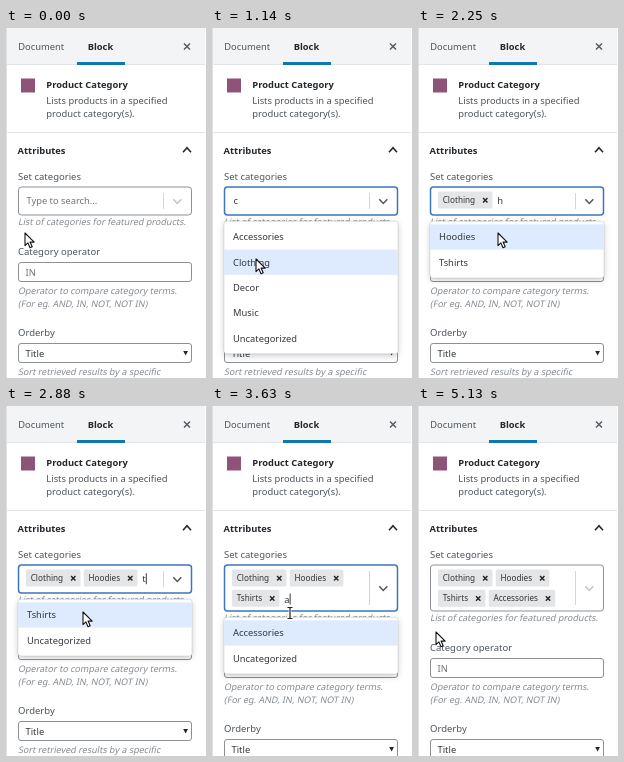
Recreate the animation shown at these times as an HTML page. Size 200 by 350 pixels, loop 5.31 s.

```html
<!DOCTYPE html>
<html lang="en">
<head>
<meta charset="utf-8">
<title>Category picker</title>
<style>
html, body { margin: 0; width: 100%; height: 100%; overflow: hidden; background: #fff; }
svg { display: block; width: 100vw; height: 100vh; }
text { font: 9.35px "Noto Sans", "Open Sans", sans-serif; fill: #4c545d; white-space: pre; }
.bold { font-weight: 600; fill: #23282d; }
.body { font-size: 9.4px; }
.label { font-size: 9.5px; }
.help { font-size: 9.05px; fill: #858b92; }
.value { fill: #32373c; }
.hint { font-size: 9.3px; fill: #747474; }
.tag { font-size: 8.2px; fill: #333; }
.box { fill: #fff; stroke: #8d9197; }
.line { fill: none; stroke-linecap: butt; }
.menu { fill: #fff; filter: drop-shadow(0 2.5px 3px rgba(0, 0, 0, .2)); }
</style>
</head>
<body>
<svg id="stage" viewBox="0 0 200 350" xmlns="http://www.w3.org/2000/svg">
  <rect width="200" height="350" fill="#fff"/>
  <g id="head"></g>
  <g id="lower"></g>
  <g id="control"></g>
  <g id="menu"></g>
  <g id="pointer"></g>
</svg>
<script>
const LOOP = 5310;
const ROW = 25.3, GROW = 18;
const $ = id => document.getElementById(id);

// Markup helpers
const text = (x, y, s, cls = '') => `<text x="${x}" y="${y}" class="${cls}">${s}</text>`;
const help = (y, s) => `<g transform="translate(12 ${y}) skewX(-11)">${text(0, 0, s, 'help')}</g>`;
const rect = (x, y, w, h, attrs) => `<rect x="${x}" y="${y}" width="${w}" height="${h}" ${attrs}/>`;
const line = (d, color, width) => `<path class="line" d="${d}" stroke="${color}" stroke-width="${width}"/>`;
const cross = (x, y, r, color, width) =>
  line(`M${x - r} ${y - r}l${2 * r} ${2 * r}M${x + r} ${y - r}l${-2 * r} ${2 * r}`, color, width);
const chevron = (x, y, w, h, color, width) =>
  line(`M${x - w} ${y - h / 2}l${w} ${h}l${w} ${-h}`, color, width);

const ruler = document.createElement('canvas').getContext('2d');
const widthOf = (s, size) => {
  ruler.font = `${size}px "Noto Sans", "Open Sans", sans-serif`;
  return ruler.measureText(s).width;
};

// What happens in the field, in order of time
const steps = [
  { at: 0, tags: [], typed: '' },
  { at: 420, focus: true, tags: [], typed: '' },
  { at: 570, focus: true, tags: [], typed: 'c',
    options: ['Accessories', 'Clothing', 'Decor', 'Music', 'Uncategorized'] },
  { at: 1200, focus: true, tags: ['Clothing'], typed: '' },
  { at: 1740, focus: true, tags: ['Clothing'], typed: 'h', options: ['Hoodies', 'Tshirts'] },
  { at: 2340, focus: true, tags: ['Clothing', 'Hoodies'], typed: '' },
  { at: 2640, focus: true, tags: ['Clothing', 'Hoodies'], typed: 't',
    options: ['Tshirts', 'Uncategorized'] },
  { at: 2970, focus: true, tags: ['Clothing', 'Hoodies', 'Tshirts'], typed: '' },
  { at: 3480, focus: true, tags: ['Clothing', 'Hoodies', 'Tshirts'], typed: 'a',
    options: ['Accessories', 'Uncategorized'] },
  { at: 4200, focus: true, tags: ['Clothing', 'Hoodies', 'Tshirts', 'Accessories'], typed: '' },
  { at: 4710, tags: ['Clothing', 'Hoodies', 'Tshirts', 'Accessories'], typed: '' }
];

// Pointer path: time, x, y
const path = [
  [0, 19, 205], [30, 19, 205], [400, 27, 172], [690, 27, 172], [1080, 44, 231],
  [1260, 44, 231], [1500, 42, 230], [1650, 42, 230], [2160, 80, 205], [2340, 80, 205],
  [2460, 77, 206], [2970, 77, 206], [3390, 78, 207], [3930, 78, 207], [4140, 74, 226],
  [4260, 74, 226], [4680, 18, 226], [LOOP, 18, 226]
];

function pointerAt(t) {
  const i = Math.max(1, path.findIndex(p => p[0] > t));
  const [t0, x0, y0] = path[i - 1], [t1, x1, y1] = path[i];
  const u = (t - t0) / (t1 - t0), k = u * u * (3 - 2 * u);
  return [x0 + (x1 - x0) * k, y0 + (y1 - y0) * k];
}

function drawStatic() {
  $('head').innerHTML =
    rect(0, 0, 199, 36, 'fill="#f3f4f5"') +
    rect(0, 36, 199, 1, 'fill="#e2e4e7"') +
    rect(0, 0, 1, 350, 'fill="#dfe1e4"') +
    rect(71, 34, 48, 3, 'fill="#0b78b0"') +
    text(12.3, 22, 'Document') +
    text(81.7, 22, 'Block', 'bold') +
    cross(181, 18.5, 3, '#555d66', 1.5) +
    rect(15, 50.5, 14, 14, 'fill="#8d5478"') +
    text(40.3, 59.7, 'Product Category', 'bold') +
    text(40.3, 76, 'Lists products in a specified', 'body') +
    text(40.3, 89, 'product category(s).', 'body') +
    rect(0, 104, 199, 1, 'fill="#e2e4e7"') +
    text(11.6, 126, 'Attributes', 'bold') +
    chevron(181, 122, 4, -4.4, '#23282d', 1.6) +
    text(12, 152.2, 'Set categories', 'label');

  $('lower').innerHTML =
    help(197.3, 'List of categories for featured products.') +
    text(12, 226.7, 'Category operator', 'label') +
    rect(12.5, 234.5, 173, 19, 'rx="2.5" class="box"') +
    text(19.5, 247.5, 'IN', 'hint') +
    help(265.5, 'Operator to compare category terms.') +
    help(279.3, '(For eg. AND, IN, NOT, NOT IN)') +
    text(12, 307.5, 'Orderby', 'label') +
    rect(12.5, 315.5, 173, 19, 'rx="2.5" class="box"') +
    text(19.5, 328.5, 'Title', 'value') +
    '<path d="M177.2 323h4.8l-2.4 4.4z" fill="#23282d"/>' +
    help(346.5, 'Sort retrieved results by a specific');
}

function drawControl(state, shift, caretOn) {
  const { focus, tags, typed } = state;
  const mid = 173 + shift / 2;
  let out = rect(12.5, 159, 173, 28 + shift, focus
    ? 'rx="3" fill="#fff" stroke="#3d76bd" stroke-width="1.5"'
    : 'rx="3" class="box"');
  let x = 20, y = 163.5;
  for (const tag of tags) {
    const w = widthOf(tag, 8.2) + 22;
    if (x + w > 152) { x = 20; y += 20.3; }
    out += rect(x, y, w, 17, 'rx="1.5" fill="#e4e5e7"') +
      text(x + 4.7, y + 11.6, tag, 'tag') +
      cross(x + w - 7.2, y + 8.7, 2.2, '#222', 1.4);
    x += w + 3.3;
  }
  x += 1.5;
  if (!tags.length && !typed) out += text(20.5, 176.2, 'Type to search...', 'hint');
  if (typed) out += text(x, y + 12.8, typed, 'value');
  if (caretOn) out += rect(x + widthOf(typed, 9.35) + .2, y + 3.7, .9, 11, 'fill="#222"');
  out += rect(157, 165, .8, 16 + shift, 'fill="#ccc"') +
    chevron(171.3, mid + .3, 4, 4.2, focus ? '#555' : '#c4c4c4', 1.5);
  $('control').innerHTML = out;
}

function drawMenu(options, shift, py) {
  if (!options) { $('menu').innerHTML = ''; return; }
  const top = 193.3 + shift, first = top + 3;
  const over = Math.floor((py - first) / ROW);
  const active = over >= 0 && over < options.length ? over : 0;
  const h = options.length * ROW + 6;
  $('menu').innerHTML =
    rect(12, top, 174, h, 'rx="2.5" class="menu" stroke="#000" stroke-opacity=".1"') +
    rect(12, first + active * ROW, 174, ROW, 'fill="#deebff"') +
    options.map((s, i) => text(21, first + i * ROW + 16, s, 'value')).join('');
}

function drawPointer(x, y, beam) {
  const d = beam
    ? 'M-2.5 -5.5h2l.5 .6l.5 -.6h2M0 -5v10M-2.5 5.5h2l.5 -.6l.5 .6h2'
    : 'M0 0V12.6L2.9 9.9L5 14.7L7.2 13.7L5.1 9.1H9.2Z';
  $('pointer').innerHTML = `<g transform="translate(${x} ${y})">` + (beam
    ? line(d, '#fff', 2.8) + line(d, '#222', 1.2)
    : `<path d="${d}" fill="#fff" stroke="#111" stroke-width="1.1" stroke-linejoin="round"/>`) + '</g>';
}

function update(t) {
  const state = steps.filter(s => s.at <= t).pop();
  const shift = state.tags.length > 2 ? GROW : 0;
  const caretOn = state.focus && (t - state.at) % 1000 < 500;
  const [x, y] = pointerAt(t);
  $('lower').setAttribute('transform', `translate(0 ${shift})`);
  drawControl(state, shift, caretOn);
  drawMenu(state.options, shift, y);
  drawPointer(x, y, t >= 3000 && t < 3990);
}

drawStatic();
const start = performance.now();
function tick() {
  update((performance.now() - start) % LOOP);
  requestAnimationFrame(tick);
}
tick();
</script>
</body>
</html>
```
